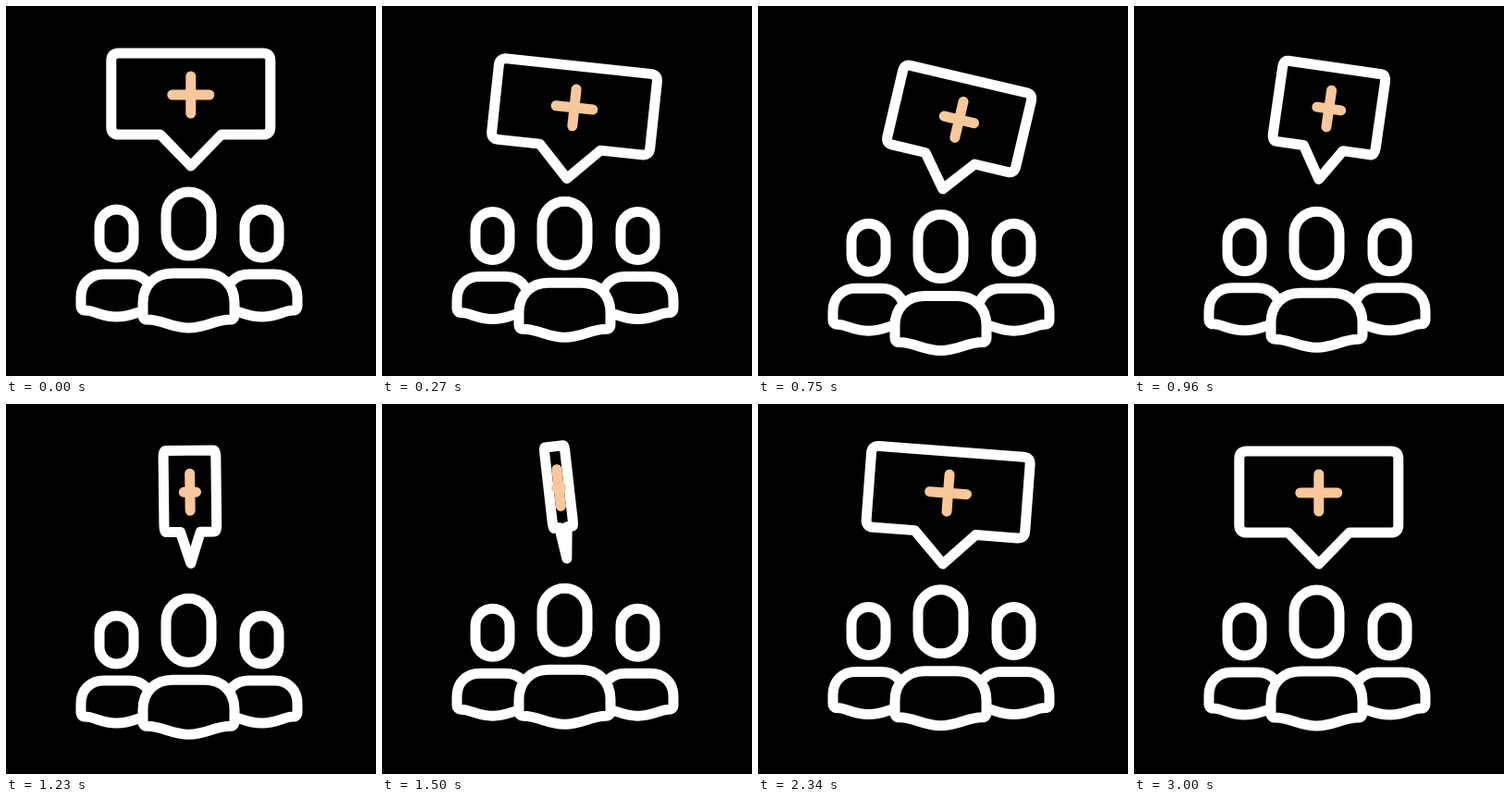
Animation of 400 by 400 pixels, one loop 5.09 s. Source, as an HTML page:

```html
<!DOCTYPE html>
<html lang="en">
<head>
<meta charset="utf-8">
<title>Group consultation</title>
<style>
html, body { margin: 0; width: 100%; height: 100%; overflow: hidden; background: #000; }
svg { display: block; width: 100%; height: 100%; }
</style>
</head>
<body>
<svg viewBox="0 0 400 400" fill="#000" stroke="#fff" stroke-width="11" stroke-linecap="round" stroke-linejoin="round">
  <g id="sides">
    <g id="side">
      <rect x="101" y="220" width="37" height="52" rx="18.5"/>
      <path d="M106 290H133C148 290 158 300 158 315V324Q158 329 153 329C144 329 136 336 119.5 336C103 336 95 329 86 329Q81 329 81 324V315C81 300 91 290 106 290Z"/>
    </g>
    <use href="#side" transform="matrix(-1 0 0 1 396 0)"/>
  </g>
  <g id="center">
    <rect x="173" y="201" width="49" height="69" rx="24.5"/>
    <path d="M180 289H215C234 289 247 302 247 321V334Q247 339 242 339C226 339 216 348 197.5 348C179 348 169 339 153 339Q148 339 148 334V321C148 302 161 289 180 289Z"/>
  </g>
  <g id="bubble" fill="none">
    <path id="box"/>
    <path id="plus" stroke="#f8c79a"/>
  </g>
</svg>
<script>
const LOOP = 5090, STEP = 30;
const $ = id => document.getElementById(id);
const clamp = v => Math.min(1, Math.max(0, v));
const progress = (t, from, to) => clamp((t - from) / (to - from));
const easeSine = p => (1 - Math.cos(Math.PI * p)) / 2;

// Swings from 0 through the given [time, value] turning points
function swing(...turns) {
  return t => {
    let t0 = 0, v = 0;
    for (const [t1, v1] of turns) {
      v += (v1 - v) * easeSine(progress(t, t0, t1));
      if (t < t1) break;
      t0 = t1;
    }
    return v;
  };
}

const centerY = swing([600, 24.5], [760, 24.5], [1660, -4], [2450, 0]);
const sideY = t => 0.62 * centerY(t - 110);
const bubbleY = swing([560, 28.5], [1460, -6], [2350, 0]);
const tilt = swing([600, 14.4], [1590, -6.9], [2360, 4.3], [3000, 0]);

// Half turn about the upright axis: speeds up to edge-on, then slows down
const EDGE_ON = 1445;
const flip = t => t < EDGE_ON
  ? 1 - progress(t, 260, EDGE_ON) ** 2
  : progress(t, 2270, EDGE_ON) ** 2 - 1;

// Outlines are squeezed in x while the stroke keeps its width
function boxPath(s) {
  const x = v => (v * s).toFixed(2);
  return `M${x(-78)} -122H${x(78)}Q${x(86)} -122 ${x(86)} -114V-42Q${x(86)} -34 ${x(78)} -34`
    + `H${x(33)}L0 0L${x(-33)} -34H${x(-78)}Q${x(-86)} -34 ${x(-86)} -42V-114Q${x(-86)} -122 ${x(-78)} -122Z`;
}

const plusPath = s => `M${-20 * s} -77H${20 * s}M0 -97V-57`;

function draw(t) {
  const s = flip(t);
  $("center").setAttribute("transform", `translate(0 ${centerY(t)})`);
  $("sides").setAttribute("transform", `translate(0 ${sideY(t)})`);
  $("bubble").setAttribute("transform", `translate(199.8 ${173 + bubbleY(t)}) rotate(${tilt(t)})`);
  $("box").setAttribute("d", boxPath(s));
  $("plus").setAttribute("d", plusPath(s));
}

const start = performance.now();
function frame() {
  const t = (performance.now() - start) % LOOP;
  draw(Math.floor(t / STEP) * STEP);
  requestAnimationFrame(frame);
}
frame();
</script>
</body>
</html>
```
